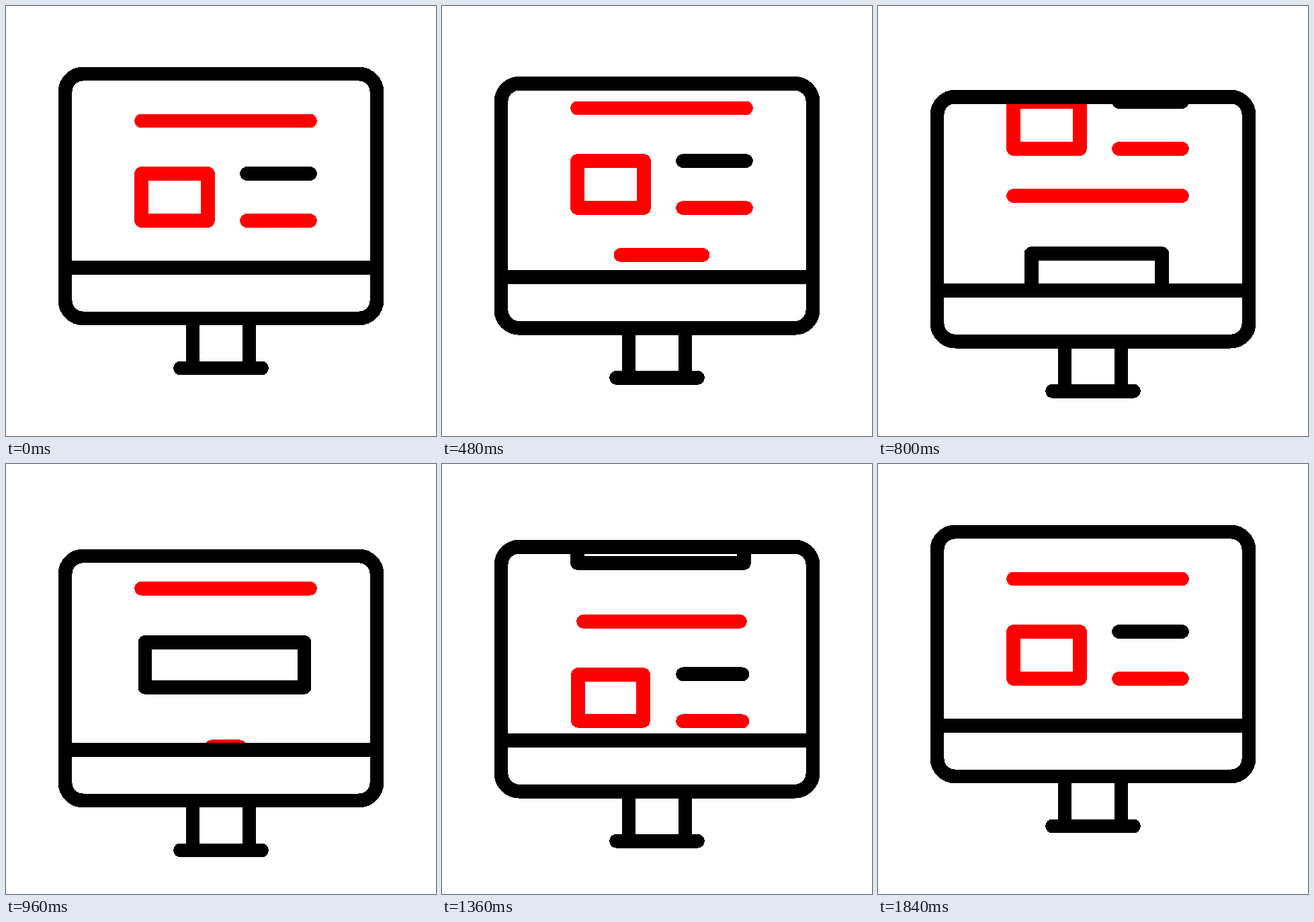
An HTML page for the animation above (1.88 s loop, 640 by 640 pixels).

```html
<!DOCTYPE html>
<html lang="en">
<head>
<meta charset="utf-8">
<title>Scrolling page on a monitor</title>
<style>
html, body { margin: 0; width: 100%; height: 100%; overflow: hidden; background: #fff; }
svg { display: block; }
#stage { width: 100vw; height: 100vh; }
</style>
</head>
<body>
<svg id="stage" viewBox="0 0 640 640" fill="none" stroke="#000" stroke-width="20.8"
     stroke-linecap="round" stroke-linejoin="round" shape-rendering="crispEdges">
  <g id="monitor">
    <svg x="88" y="101" width="464" height="289" viewBox="88 101 464 289" overflow="hidden">
      <g id="page"></g>
    </svg>
    <rect x="88" y="101" width="464" height="364" rx="27"/>
    <path d="M88 389.5H552M278 465V539M362 465V539M259.5 539H380.5"/>
  </g>
</svg>
<script>
const LOOP = 1880, STEP = 40, SPAN = 1800;
const SCROLL = 454, DROP = 36;
const RED = '#f00', BLACK = '#000';
const monitor = document.getElementById('monitor');
const page = document.getElementById('page');

// Cubic-bezier easing with handles (a, 0) and (b, 1).
function bezier(a, b) {
  return x => {
    if (x <= 0) return 0;
    if (x >= 1) return 1;
    let lo = 0, hi = 1;
    for (let i = 0; i < 30; i++) {
      const s = (lo + hi) / 2, r = 1 - s;
      if (3 * a * s * r * r + 3 * b * s * s * r + s * s * s < x) lo = s;
      else hi = s;
    }
    return lo * lo * (3 - 2 * lo);
  };
}

const scrollEase = bezier(0.617, 0.383);
const riseEase = bezier(0.6, 0.4);
const lineEase = bezier(0.49, 0.83);

const shown = () => 1;
const grow = (ease, start, length) => t => ease((t - start) / length);
const midLine = grow(lineEase, 0, 720);
const wideBox = grow(scrollEase, 183, 917);
const headLine = grow(lineEase, 670, 720);
const smallBox = grow(scrollEase, 528, 917);
const sideLine = grow(lineEase, 598, 790);

const parts = [];

function add(color, size, draw) {
  const el = document.createElementNS('http://www.w3.org/2000/svg', 'path');
  el.setAttribute('stroke', color);
  page.append(el);
  parts.push(t => el.setAttribute('d', draw(size(t))));
}

// anchor: 0 grows from the left end, 0.5 from the middle
function line(color, x1, x2, y, size, anchor) {
  const w = x2 - x1, pin = x1 + w * anchor;
  add(color, size, k => {
    const x = pin - w * k * anchor;
    return `M${x} ${y}H${x + Math.max(w * k, 0.01)}`;
  });
}

function box(color, x1, x2, cy, size) {
  const cx = (x1 + x2) / 2;
  add(color, size, k => {
    const w = (x2 - x1) * k, h = 70 * k;
    return `M${cx - w / 2} ${cy - h / 2}h${w}v${h}h${-w}z`;
  });
}

function article(y, head, frame, side) {
  line(RED, 201.5, 452.5, y, head, 0.5);
  box(RED, 201.5, 300.5, y + 113.5, frame);
  line(BLACK, 358.5, 452.5, y + 78.5, side, 0);
  line(RED, 358.5, 452.5, y + 148.5, side, 0);
}

article(171, shown, shown, shown);
line(RED, 201.5, 452.5, 389.5, midLine, 0.5);
box(BLACK, 201.5, 449.5, 503, wideBox);
article(171 + SCROLL, headLine, smallBox, sideLine);

function render(ms) {
  const t = Math.max(0, Math.floor(ms % LOOP / STEP) * STEP - STEP);
  const drop = DROP * riseEase(t / 960) * (1 - scrollEase((t - 920) / 880));
  monitor.setAttribute('transform', `translate(0 ${drop})`);
  page.setAttribute('transform', `translate(0 ${-SCROLL * scrollEase(t / SPAN)})`);
  parts.forEach(draw => draw(t));
}

let begin;
function tick(now) {
  begin ??= now;
  render(now - begin);
  requestAnimationFrame(tick);
}
render(0);
requestAnimationFrame(tick);
</script>
</body>
</html>
```
